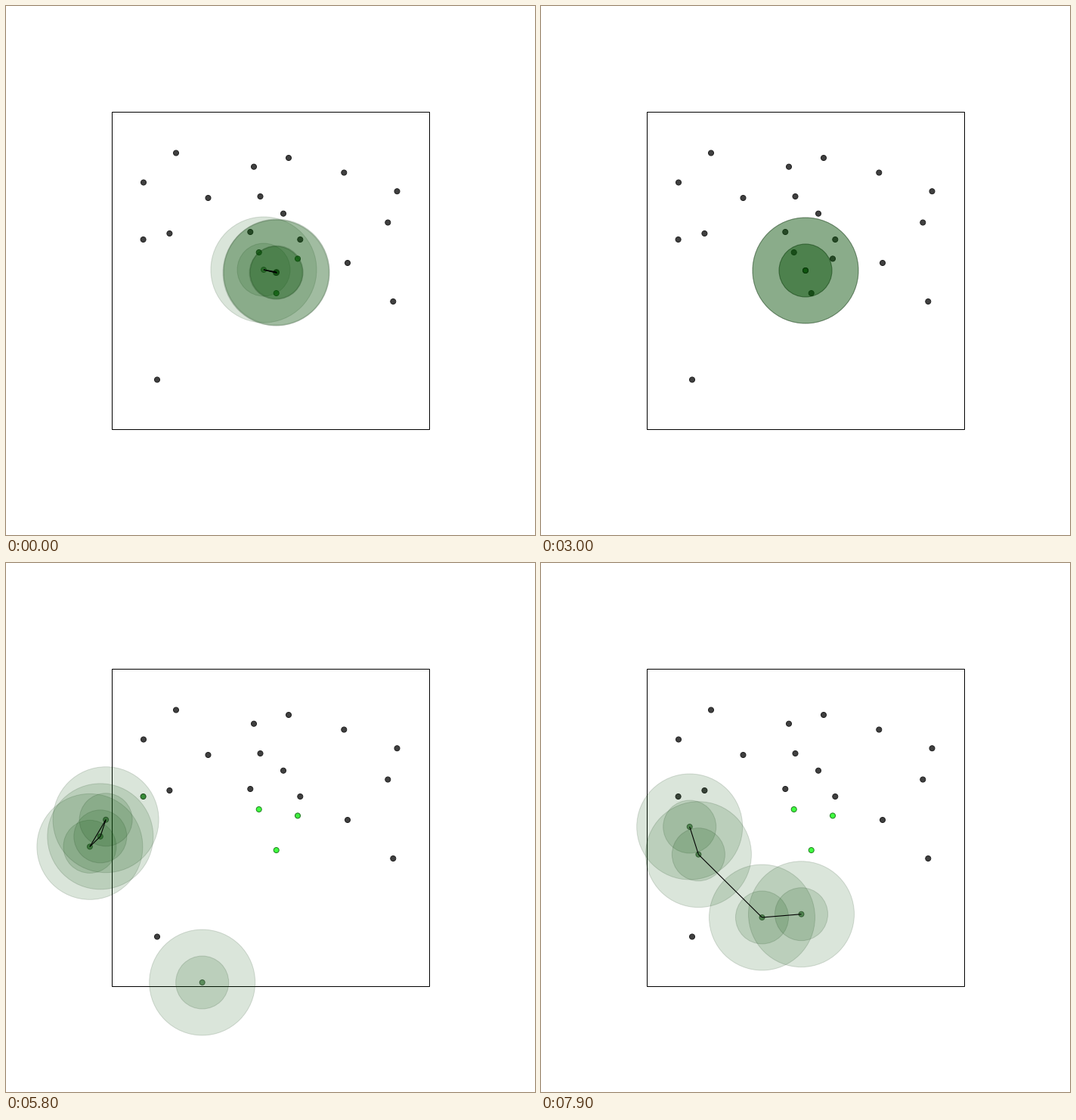
Animation of 700x700 px, one loop 8000 ms. Source, as a matplotlib script:

```python
import numpy as np
import matplotlib.pyplot as plt
from matplotlib.animation import FuncAnimation
from matplotlib.collections import LineCollection
from matplotlib.patches import Circle, Rectangle

SIZE, DPI = 700, 100
FRAMES, INTERVAL = 80, 100
EPISODE = 31            # steps before all agents return to the centre
CENTRE = (350, 350)
SENSE, REACH, BODY = 70, 35, 3.5
GAIN = 0.15             # coverage per agent and step
PX = 72 / DPI
AGENT = np.array([0.05, 0.335, 0.05])

LANDMARKS = np.array([
    (225, 194.5), (182, 233.5), (267.5, 254), (328, 212.7), (374, 201),
    (336.5, 252), (367, 274.7), (447.3, 220.5), (517.5, 245.2), (505.3, 286.5),
    (452, 340), (512.3, 391), (389.3, 309), (323.3, 299), (216.4, 301),
    (181.6, 309), (200, 494.5), (334.7, 326), (386, 334.4), (357.7, 380),
])

# Waypoints (step, x, y) of the four agents in each episode.
FIRST = [
    [(1, 341, 349), (12, 249.5, 366), (21, 171, 364)],
    [(1, 358, 352), (12, 296.7, 406.3), (21, 224.3, 433)],
    [(1, 357, 353), (12, 410, 413), (21, 387.5, 482)],
    [(1, 358, 353), (12, 435.7, 393.3), (21, 412.4, 457.7), (30, 372, 517)],
]
SECOND = [
    [(18, 196.3, 366.3)],
    [(15, 319, 462), (18, 299.7, 477.7), (30, 252, 571)],
    [(2, 357, 337), (3, 352, 336), (18, 215.7, 351.5)],
    [(2, 358, 338), (3, 352, 334), (18, 218, 342.7), (30, 115, 339)],
]
THIRD = [
    [(6, 301.3, 351), (18, 196.7, 349)],
    [(3, 328, 354), (6, 311.8, 374), (18, 208.4, 385.7)],
    [(2, 361, 351), (6, 351.3, 389), (18, 292.5, 469)],
    [(2, 368, 348), (6, 386.3, 373.7), (18, 344.5, 464.7)],
]


def smooth(t, v):
    """Monotone cubic through the waypoints, straight on after the last."""
    steps = np.arange(EPISODE)
    h, slope = np.diff(t), np.diff(v) / np.diff(t)
    a, b = slope[:-1], slope[1:]
    turn = a * b <= 0
    inner = np.where(turn, 0, 2 * a * b / np.where(turn, 1, a + b))
    m = np.concatenate([slope[:1], inner, slope[-1:]])
    s = np.minimum(steps, t[-1])
    k = np.clip(np.searchsorted(t, s, side="right") - 1, 0, len(h) - 1)
    u = (s - t[k]) / h[k]
    w = u * u * (3 - 2 * u)
    bend = h[k] * u * (1 - u) * ((1 - u) * m[k] - u * m[k + 1])
    return (1 - w) * v[k] + w * v[k + 1] + bend + (steps - s) * m[-1]


def track(points):
    t, x, y = np.array([(0, *CENTRE)] + points, float).T
    return np.stack([smooth(t, x), smooth(t, y)], axis=1)


def coverage(pos):
    gap = np.linalg.norm(pos[:, :, None] - LANDMARKS, axis=-1)
    hits = (gap < REACH).sum(axis=1)
    hits[0] = 0
    return np.minimum(GAIN * np.cumsum(hits, axis=0), 1)


tracks = [np.stack([track(p) for p in paths], axis=1)
          for paths in (FIRST, SECOND, THIRD)]
covers = [coverage(pos) for pos in tracks]

fig = plt.figure(figsize=(SIZE / DPI, SIZE / DPI), dpi=DPI, facecolor="white")
ax = fig.add_axes([0, 0, 1, 1])
ax.set(xlim=(0, SIZE), ylim=(SIZE, 0))
ax.axis("off")


def disc(center, radius, color, alpha, z):
    patch = Circle(center, radius, facecolor=(*color, alpha),
                   edgecolor=(*(0.5 * np.array(color)), alpha),
                   linewidth=PX, zorder=z)
    return ax.add_patch(patch)


ax.add_patch(Rectangle((140, 140), 420, 420, fill=False, edgecolor="black",
                       linewidth=PX, snap=True, zorder=1))
dots = [disc(p, BODY, (0.25,) * 3, 1, 2) for p in LANDMARKS]
agents = [[disc(CENTRE, r, AGENT, alpha, 3 + i)
           for r, alpha in ((SENSE, 0.15), (REACH, 0.15), (BODY, 0.55))]
          for i in range(4)]
links = ax.add_collection(LineCollection([], colors="black", linewidths=PX * 1.1,
                                         zorder=8))


def draw(frame):
    episode, step = divmod(frame + 1, EPISODE)
    pos = tracks[episode][step]
    for rings, p in zip(agents, pos):
        for ring in rings:
            ring.set_center(p)
    for dot, c in zip(dots, covers[episode][step]):
        color = np.array([0.25, 0.25 + 0.75 * c, 0.25])
        dot.set_facecolor(color)
        dot.set_edgecolor(color * 0.5)
    links.set_segments([(pos[i], pos[j]) for i in range(4) for j in range(i)
                        if np.linalg.norm(pos[i] - pos[j]) < 2 * SENSE])
    return [*dots, *(r for rings in agents for r in rings), links]


anim = FuncAnimation(fig, draw, frames=FRAMES, interval=INTERVAL,
                     repeat=True, repeat_delay=0, blit=False)
plt.show()
```
